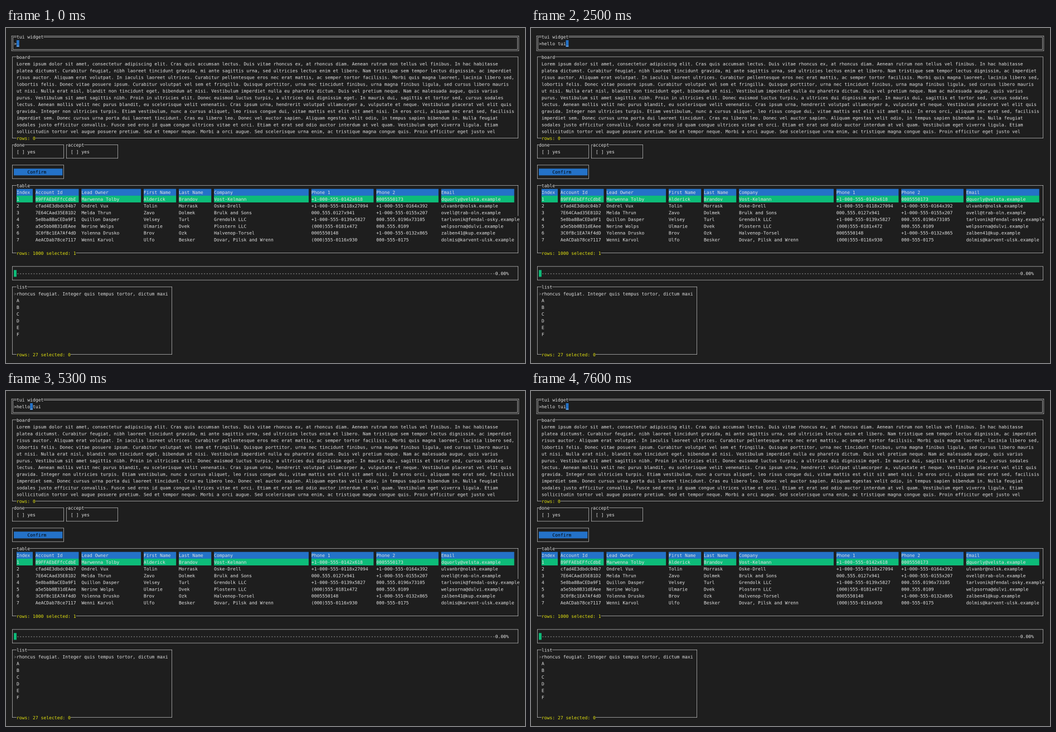
Recreate the animation shown at these times as an HTML page with a canvas. Size 931 by 601 pixels, loop 8000 ms.

```html
<!DOCTYPE html>
<html lang="en">
<head>
<meta charset="utf-8">
<title>tui widget</title>
<style>
html, body { margin: 0; width: 100%; height: 100%; overflow: hidden; background: #1e1e1e; }
canvas { display: block; width: 931px; height: 601px; }
</style>
</head>
<body>
<canvas id="stage" width="931" height="601"></canvas>
<script>
// A terminal of 8 by 20 dot cells, shown at a reduced size.
const W = 931, H = 601, SCALE = 4, LOOP = 8000;
const DOT = 0.6065, CELL_W = 8 * DOT, CELL_H = 20 * DOT, X0 = -0.5, Y0 = 21.8;
const BG = '#1e1e1e', FG = '#e5e5e5', BLUE = '#2472c8', GREEN = '#0dbc79',
      YELLOW = '#e5e510', DIM = '#777777', BLACK = '#000000';

const out = document.getElementById('stage').getContext('2d');
const big = document.createElement('canvas');
big.width = W * SCALE;
big.height = H * SCALE;
const g = big.getContext('2d');
g.scale(SCALE, SCALE);
g.font = `${CELL_W / 0.602}px "DejaVu Sans Mono", "Noto Sans Mono", monospace`;
g.textBaseline = 'alphabetic';

const board = [
  'Lorem ipsum dolor sit amet, consectetur adipiscing elit. Cras quis accumsan lectus. Duis vitae rhoncus ex, at rhoncus diam. Aenean rutrum non tellus vel finibus. In hac habitasse',
  'platea dictumst. Curabitur feugiat, nibh laoreet tincidunt gravida, mi ante sagittis urna, sed ultricies lectus enim et libero. Nam tristique sem tempor lectus dignissim, ac imperdiet',
  'risus auctor. Aliquam erat volutpat. In iaculis laoreet ultrices. Curabitur pellentesque eros nec erat mattis, ac semper tortor facilisis. Morbi quis magna laoreet, lacinia libero sed,',
  'lobortis felis. Donec vitae posuere ipsum. Curabitur volutpat vel sem et fringilla. Quisque porttitor, urna nec tincidunt finibus, urna magna finibus ligula, sed cursus libero mauris',
  'ut nisi. Nulla erat nisl, blandit non tincidunt eget, bibendum at nisi. Vestibulum imperdiet nulla eu pharetra dictum. Duis vel pretium neque. Nam ac malesuada augue, quis varius',
  'purus. Vestibulum sit amet sagittis nibh. Proin in ultricies elit. Donec euismod luctus turpis, a ultrices dui dignissim eget. In mauris dui, sagittis et tortor sed, cursus sodales',
  'lectus. Aenean mollis velit nec purus blandit, eu scelerisque velit venenatis. Cras ipsum urna, hendrerit volutpat ullamcorper a, vulputate et neque. Vestibulum placerat vel elit quis',
  'gravida. Integer non ultricies turpis. Etiam vestibulum, nunc a cursus aliquet, leo risus congue dui, vitae mattis est elit sit amet nisi. In eros orci, aliquam nec erat sed, facilisis',
  'imperdiet sem. Donec cursus urna porta dui laoreet tincidunt. Cras eu libero leo. Donec vel auctor sapien. Aliquam egestas velit odio, in tempus sapien bibendum in. Nulla feugiat',
  'sodales justo efficitur convallis. Fusce sed eros id quam congue ultrices vitae et orci. Etiam et erat sed odio auctor interdum at vel quam. Vestibulum eget viverra ligula. Etiam',
  'sollicitudin tortor vel augue posuere pretium. Sed et tempor neque. Morbi a orci augue. Sed scelerisque urna enim, ac tristique magna congue quis. Proin efficitur eget justo vel'
];

const columns = [4, 11, 28, 51, 64, 77, 113, 137, 161, 189];
const table = [
  'Index|Account Id|Lead Owner|First Name|Last Name|Company|Phone 1|Phone 2|Email',
  '1|89FFAEbEFfcCdbE|Marwenna Tolby|Alderick|Brandov|Vost-Kelmann|+1-000-555-0142x618|0005550173|dquorly@velsta.example',
  '2|cfad4E3dbdc04b7|Ondrel Vux|Tolin|Morrask|Oske-Drell|+1-000-555-0118x27094|+1-000-555-0164x392|ulvanbr@nolsk.example',
  '3|7E64CAad35E81D2|Melda Thrun|Zavo|Dolmek|Brulk and Sons|000.555.0127x941|+1-000-555-0155x207|ovell@trab-oln.example',
  '4|5e8ba8BaCEDa9F1|Quillon Dasper|Velsey|Turl|Grendolk LLC|+1-000-555-0139x5827|000.555.0196x73105|tarlvonik@fendal-osky.example',
  '5|a5e5bb0B31dEAee|Nerine Wolps|Ulmarie|Dvek|Plostern LLC|(000)555-0181x472|000.555.0109|welpsorna@dulvi.example',
  '6|3C0fBc1EA7Af4dD|Yolenna Drusko|Brov|Ozk|Halvenop-Torsel|0005550148|+1-000-555-0132x865|zalben41@kup.example',
  '7|AeACDab78ce7117|Wenni Karvol|Ulfo|Besker|Dovar, Pilsk and Wrenn|(000)555-0116x930|000-555-0175|dolmis@karvent-ulsk.example'
];

// Strings are typed; numbers move the caret.
const keys = [
  [1300, 'h'], [1400, 'e'], [1500, 'l'], [1700, 'l'], [1800, 'o'],
  [2000, ' '], [2300, 'tu'], [2500, 'i'],
  [4000, -1], [4200, -1], [4300, -1], [4500, -1], [4600, -1], [4800, -1],
  [5100, 1], [5300, 1], [5600, ' '], [5800, ' '],
  [6200, 'back'], [6400, 'back'], [6700, 'end'], [7200, 'home'], [7600, 'end']
];

const colX = c => X0 + c * CELL_W;
const rowY = r => Y0 + r * CELL_H;
const lineX = c => colX(c) + 3 * DOT;
const lineY = r => rowY(r) + 9 * DOT;

function rect(x, y, w, h, color) {
  g.fillStyle = color;
  g.fillRect(x, y, w, h);
}

function fill(c, r, n, color) {
  rect(colX(c), rowY(r), n * CELL_W, CELL_H, color);
}

// One glyph per terminal cell.
function text(str, c, r, color = FG) {
  g.fillStyle = color;
  [...str].forEach((ch, i) => {
    if (ch !== ' ') g.fillText(ch, colX(c + i), rowY(r) + 15 * DOT);
  });
}

function label(str, c, r, color = FG) {
  fill(c, r, str.length, BG);
  text(str, c, r, color);
}

function frame(c1, r1, c2, r2, grow = 0) {
  const x = lineX(c1) - grow, y = lineY(r1) - grow;
  const right = lineX(c2) + grow, bottom = lineY(r2) + grow;
  rect(x, y, right - x + DOT, DOT, FG);
  rect(x, bottom, right - x + DOT, DOT, FG);
  rect(x, y, DOT, bottom - y + DOT, FG);
  rect(right, y, DOT, bottom - y + DOT, FG);
}

function box(c1, r1, c2, r2, title = '', c = 4) {
  frame(c1, r1, c2, r2);
  label(title, c, r1);
}

function drawTable() {
  box(2, 21, 189, 31, 'table');
  table.forEach((line, i) => {
    const r = 22 + i;
    line.split('|').forEach((value, k) => {
      const c = columns[k], width = columns[k + 1] - c - 1;
      if (i < 2) fill(c, r, width, i ? GREEN : BLUE);
      if (value.length > width + 1) label(value, c, r);
      else text(value, c, r);
    });
  });
  label('rows: 1000 selected: 1', 4, 31, YELLOW);
}

function drawInput(value, caret) {
  frame(2, -1, 189, 1, 2 * DOT);
  frame(2, -1, 189, 1, -2 * DOT);
  label('tui widget', 4, -1);
  text('>', 3, 0);
  fill(4 + caret, 0, 1, BLUE);
  text(value, 4, 0);
  rect(colX(4 + caret), rowY(0) + 17 * DOT, CELL_W, DOT, FG);
}

function draw(value, caret) {
  rect(0, 0, W, H, BG);
  drawInput(value, caret);

  box(2, 2, 189, 14, 'board');
  board.forEach((line, i) => text(line, 4, 3 + i));
  label('rows: 0', 4, 14, YELLOW);

  box(2, 15, 21, 17, 'done', 3);
  text('[ ] yes', 4, 16);
  box(22, 15, 41, 17, 'accept', 23);
  text('[ ] yes', 24, 16);

  box(2, 18, 21, 20);
  fill(3, 19, 18, BLUE);
  text('Confirm', 8, 19, BLACK);

  drawTable();

  box(2, 33, 189, 35);
  fill(3, 34, 1, GREEN);
  text('-'.repeat(177) + '0.00%', 4, 34);

  box(2, 36, 61, 46, 'list');
  text('>', 3, 37, DIM);
  text('rhoncus feugiat. Integer quis tempus tortor, dictum maxi', 4, 37);
  [...'ABCDEF'].forEach((ch, i) => text(ch, 4, 38 + i));
  label('rows: 27 selected: 0', 4, 46, YELLOW);

  out.imageSmoothingEnabled = true;
  out.imageSmoothingQuality = 'high';
  out.drawImage(big, 0, 0, W, H);
}

function inputAt(time) {
  let value = '', caret = 0;
  for (const [at, key] of keys) {
    if (at > time) break;
    if (typeof key === 'number') caret += key;
    else if (key === 'home') caret = 0;
    else if (key === 'end') caret = value.length;
    else if (key === 'back') {
      value = value.slice(0, caret - 1) + value.slice(caret);
      caret--;
    } else {
      value = value.slice(0, caret) + key + value.slice(caret);
      caret += key.length;
    }
  }
  return { value, caret };
}

let shown = null;
function tick() {
  const { value, caret } = inputAt((performance.now() - start) % LOOP);
  const state = value + '|' + caret;
  if (state !== shown) {
    shown = state;
    draw(value, caret);
  }
  requestAnimationFrame(tick);
}

const start = performance.now();
tick();
</script>
</body>
</html>
```
